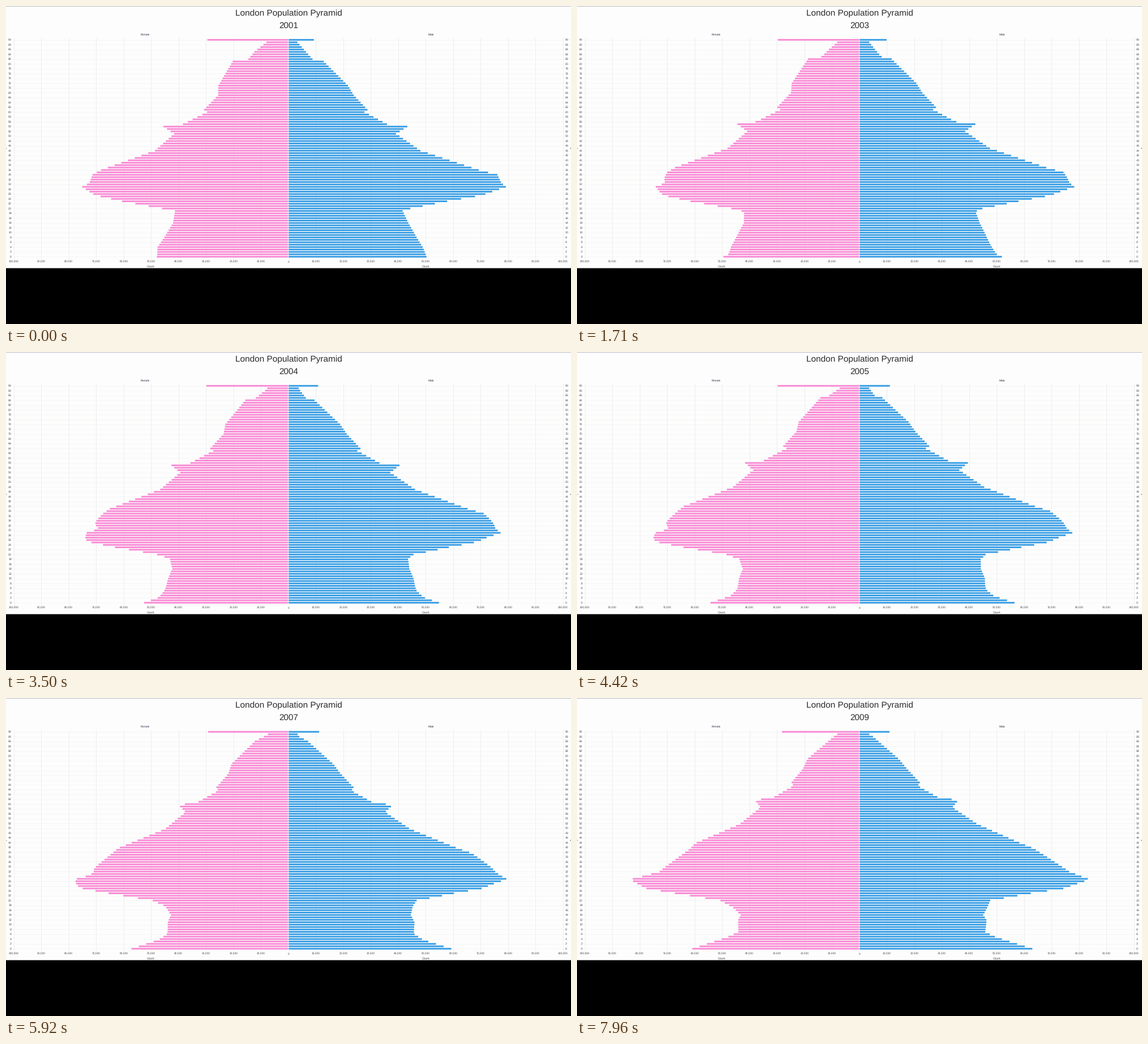
Animation of 998x561 px, one loop 8000 ms. Source, as a matplotlib script:

```python
import numpy as np
import matplotlib.pyplot as plt
from matplotlib.animation import FuncAnimation
from matplotlib.collections import LineCollection, PolyCollection
from matplotlib.patches import Rectangle

W, H, DPI = 998, 561, 100
STEP, LOOP = 40, 8000            # ms
START, PERIOD, TWEEN = 540, 1020, 500
X0, PER_K = 498.8, 4.851         # centre axis, pixels per thousand
Y0, PER_AGE, BAR = 442.3, 4.251, 2.9
PINK, BLUE, INK = "#f98ad5", "#389de4", "#2b2b2b"
FIRST, SPAN = 2001, 8            # years

# Corners of the outline that drift slowly:
# age at start, age at end, women at start and end, men at start and end (thousands)
YOUNG = [
    (0, 0, 47.9, 61.5, 50.3, 63.6),
    (0.5, 5, 47.8, 48.2, 50.2, 49.8),
    (4, 7, 47.6, 44.1, 48.9, 45.9),
    (8, 12, 45.2, 44.2, 46.7, 46.4),
    (14, 14, 42.0, 43.3, 43.7, 45.2),
    (19, 17, 41.3, 46.2, 41.6, 46.8),
    (20, 20, 46.0, 50.8, 44.4, 47.8),
    (23, 23, 60.6, 67.5, 57.8, 62.8),
    (25.5, 25, 70.4, 78.0, 70.5, 75.0),
    (29, 28.7, 75.1, 84.6, 79.2, 84.6),
    (30.5, 32, 72.5, 73.1, 77.6, 76.6),
]
# Corners that grow a year older every year: age at start, then the same sizes
COHORTS = [
    (34, 71.3, 61.0, 76.1, 62.8),
    (36, 68.2, 59.6, 69.3, 58.5),
    (44, 48.6, 43.4, 48.1, 42.8),
    (51, 41.6, 35.7, 39.2, 33.6),
    (54, 45.5, 37.7, 43.3, 35.7),
    (55, 38.4, 31.2, 35.9, 28.6),
    (60, 29.6, 23.6, 27.7, 20.8),
    (61, 30.7, 24.7, 28.8, 22.0),
    (67, 25.6, 20.3, 23.8, 17.0),
    (71, 25.5, 18.7, 21.7, 14.1),
    (81, 20.3, 8.1, 12.9, 3.9),
    (82, 14.6, 7.3, 8.8, 2.3),
    (85, 12.4, 2.0, 6.4, 0.8),
    (89, 8.0, 0.8, 3.3, 0.2),
]
corners = np.array(YOUNG + [(a, a + SPAN, *sizes) for a, *sizes in COHORTS])
ages = np.arange(91)


def mix(a, b, u):
    return a + (b - a) * u


def hollow(age, width, depth):
    return depth * np.exp(-((ages - age) / width) ** 2)


def profile(u, sizes, dip, oldest):
    """Outline of one sex; u runs from 0 in the first year to 1 in the last."""
    start, end = sizes
    out = np.interp(ages, mix(corners[:, 0], corners[:, 1], u), mix(start, end, u))
    out -= np.sin(np.pi * u) * (hollow(*dip) + hollow(6, 6, 1.3))
    out[90] = mix(*oldest, u) + np.sin(np.pi * u)
    return out


progress = np.arange(SPAN + 1) / SPAN
female = [profile(u, corners[:, 2:4].T, (29.5, 2.5, 5.5), (29.5, 28.0)) for u in progress]
male = [profile(u, corners[:, 4:6].T, (27.5, 4, 4.7), (9.3, 10.9)) for u in progress]

plt.rcParams["text.hinting"] = "none"
fig = plt.figure(figsize=(W / DPI, H / DPI), dpi=DPI, facecolor="black")
ax = fig.add_axes([0, 0, 1, 1])
ax.set(xlim=(0, W), ylim=(H, 0))
ax.axis("off")


def label(x, y, text, px=4.9, ha="center", color="#444444"):
    return ax.text(x, y, text, fontsize=px * 72 / DPI, ha=ha, va="baseline",
                   color=color, family="Liberation Sans")


def box(x, y, w, h, color):
    ax.add_patch(Rectangle((x, y), w, h, fc=color, ec="none", zorder=0, snap=False))


def grid(lines, color):
    ax.add_collection(LineCollection(lines, colors=color, linewidths=0.6, zorder=1))


box(0, 0, W, 462.5, "#fdfdfd")
box(0, 0, W, 1, "#b9bac6")
box(0, 250.5, 1, 1.5, "#777777")
box(W - 1.5, 250.5, 1.5, 1.5, "#777777")

ticks = range(-100, 101, 10)
tick_x = [X0 + k * PER_K for k in ticks]
age_y = [Y0 - a * PER_AGE for a in ages[::2]]
grid([[(tick_x[0], y), (tick_x[-1], y)] for y in age_y], "#f5f5f7")
grid([[(x, 56), (x, 446)] for x in tick_x], "#ececec")

for k, x in zip(ticks, tick_x):
    label(x, 452.8, f"{abs(k) * 1000:,}")
for a, y in zip(ages[::2], age_y):
    label(10, y + 1.6, str(a), 5.2, "right")
    label(987.7, y + 1.6, str(a), 5.2, "left")
for x, name, count_x in ((246, "Female", 256), (751, "Male", 741.5)):
    label(x, 52.3, name, color="#2a2f45")
    label(count_x, 461.2, "Count", 5.1)

label(499, 16.6, "London Population Pyramid", 15.45, color=INK)
year_text = label(499, 38.4, str(FIRST), 15.3, color=INK)


def bars(color):
    coll = PolyCollection([], facecolors=color, edgecolors="none", zorder=2)
    coll.set_snap(False)
    return ax.add_collection(coll)


pink, blue = bars(PINK), bars(BLUE)
mid_y = Y0 - ages * PER_AGE
top, bottom = mid_y - BAR / 2, mid_y + BAR / 2


def quads(base, tip):
    base = np.full(len(ages), base)
    xs = np.stack([base, tip, tip, base], axis=1)
    ys = np.stack([top, top, bottom, bottom], axis=1)
    return np.stack([xs, ys], axis=2)


def ease(u):
    return 4 * u ** 3 if u < 0.5 else 1 - 4 * (1 - u) ** 3


def draw(i):
    t = i * STEP - START
    n = int(t // PERIOD) + 1
    prev = max(n - 1, 0)
    u = ease(min((t % PERIOD) / TWEEN, 1))
    pink.set_verts(quads(X0 - 0.5, X0 - mix(female[prev], female[n], u) * PER_K))
    blue.set_verts(quads(X0 + 0.5, X0 + mix(male[prev], male[n], u) * PER_K))
    year_text.set_text(str(FIRST + n))
    return pink, blue, year_text


anim = FuncAnimation(fig, draw, frames=LOOP // STEP, interval=STEP,
                     init_func=lambda: draw(0), repeat=True, repeat_delay=0)
plt.show()
```
